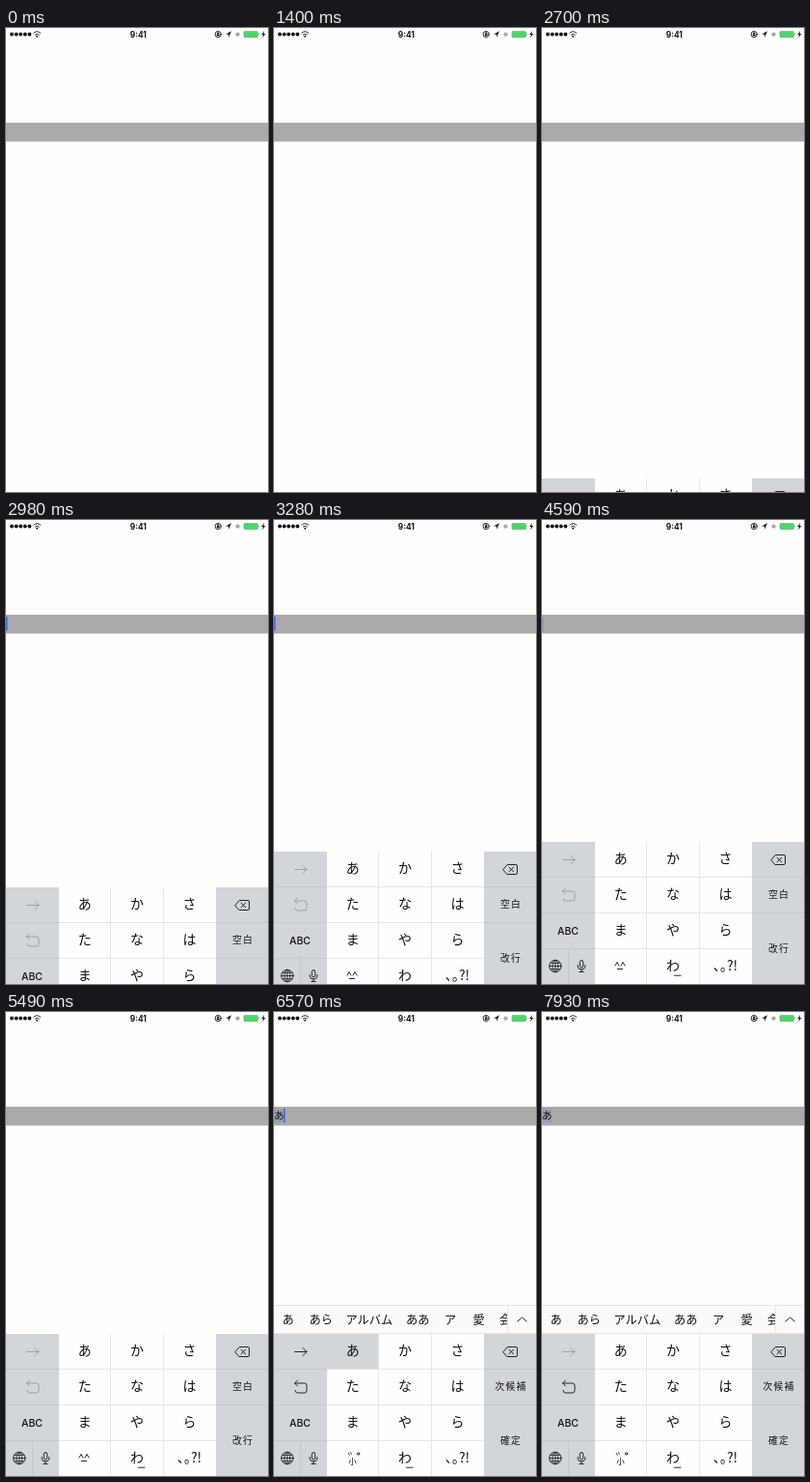
Recreate the animation shown at these times as an HTML page. Size 272 by 480 pixels, loop 8000 ms.

```html
<!DOCTYPE html>
<html lang="ja">
<head>
<meta charset="utf-8">
<style>
html, body { margin: 0; width: 100%; height: 100%; overflow: hidden; background: #fefefe; }
svg { display: block; width: 272px; height: 480px; font-family: "Noto Sans CJK JP", "Noto Sans CJK", sans-serif; fill: #111; }
.kana { font-size: 14px; text-anchor: middle; }
.label { font-size: 9.8px; text-anchor: middle; letter-spacing: 1.3px; }
.cand { font-size: 12.2px; }
.latin { font: 500 10.5px Inter, sans-serif; text-anchor: middle; }
.clock { font: 700 8.3px Inter, sans-serif; text-anchor: middle; }
.line { fill: none; stroke: #1c1c1c; stroke-width: .95; stroke-linecap: round; stroke-linejoin: round; }
.sep { fill: none; stroke: #e4e5e4; }
.edge { fill: none; stroke: #c5c8cc; }
.side { fill: #d2d5da; }
</style>
</head>
<body>
<svg viewBox="0 0 272 480">
  <g id="status">
    <g id="dots"></g>
    <path class="line" d="M28.8 5.2Q32.3 2 35.8 5.2M30.3 7Q32.3 5.2 34.3 7"/>
    <circle cx="32.3" cy="8.7" r="1"/>
    <text class="clock" x="137.3" y="9.6">9:41</text>
    <circle class="line" cx="220.2" cy="6.5" r="3.1"/>
    <path d="M218.8 6.2h2.8v2h-2.8zM219.2 6V5q1-1.4 2 0v1z"/>
    <path d="M234 3.3L227.9 6.6H231V9.8z"/>
    <circle cx="240.5" cy="6.6" r="2.2" fill="#aaa"/>
    <rect x="247" y="3.5" width="14.5" height="6.3" rx="1" fill="#4bd667" stroke="#8a9a8a" stroke-width=".6"/>
    <path d="M262.4 5.3q1.2 1.3 0 2.8z" fill="#777"/>
    <path d="M268 3L265.2 7H267L266.2 10.3L269.2 6H267.4z"/>
  </g>

  <rect y="98" width="272" height="19.5" fill="#aaa"/>
  <g id="typed">
    <rect y="100" width="10.5" height="14.5" fill="#9aa0ae"/>
    <text x="0" y="111" font-size="10.5">あ</text>
  </g>
  <rect id="caret" y="100" width="1.5" height="14.5" fill="#4065dd"/>

  <g id="bar">
    <rect y="303" width="272" height="30" fill="#fafafb"/>
    <path class="sep" d="M0 303.5H272M242.5 304V333M0 332.5H272"/>
    <clipPath id="clip"><rect y="303" width="242" height="30"/></clipPath>
    <g id="cands" class="cand" clip-path="url(#clip)"></g>
    <path class="line" d="M252.8 320L257.5 316L262.2 320"/>
  </g>

  <g id="board">
    <rect width="272" height="148" fill="#fefefe"/>
    <rect class="side" width="55" height="148"/>
    <rect class="side" x="218" width="54" height="148"/>
    <rect id="pressed" class="side" x="55" width="54" height="36.5"/>
    <path class="sep" d="M55 36.5H218M55 73.5H218M55 110.5H218M108.5 0V148M163.5 0V148"/>
    <path class="edge" d="M0 36.5H55M0 73.5H55M0 110.5H55M27.5 111V148M218 36.5H272M218 73.5H272"/>
    <g id="kana" class="kana"></g>
    <path id="next" class="line" d="M21.5 18.5H34M30 14.5L34 18.5L30 22.5"/>
    <path id="undo" class="line" d="M24.5 48L21.5 51L24.5 54M21.5 51H31.5Q34 51 34 53.5V58.5Q34 61 31.5 61H24.5Q22 61 22 58.5"/>
    <text class="latin" x="27" y="95.7">ABC</text>
    <g class="line">
      <circle cx="13.8" cy="128.5" r="6.2"/>
      <g stroke-width=".8">
        <ellipse cx="13.8" cy="128.5" rx="2.9" ry="6.2"/>
        <path d="M7.6 128.5H20M13.8 122.3V134.7M8.8 125.3H18.8M8.8 131.7H18.8"/>
      </g>
      <path d="M37.2 127.5V129Q37.5 132 41 132Q44.5 132 44.8 129V127.5M41 132V134.5M38.9 134.5H43.1"/>
      <rect x="39.3" y="122.6" width="3.4" height="7.3" rx="1.7"/>
      <path d="M238 18.5L242.3 13.5H251Q252.5 13.5 252.5 15V22Q252.5 23.5 251 23.5H242.3ZM244 16.2L248.7 20.8M248.7 16.2L244 20.8"/>
    </g>
    <path class="line" d="M137.5 138.2H144"/>
    <g id="face" class="line">
      <path d="M76 128L78 124.4L80 128M82 128L84 124.4L86 128M78.3 131.5H83.7"/>
    </g>
    <g id="marks">
      <path class="line" d="M77.3 123.5L78.2 125.2M79.5 122.7L80.3 124.2"/>
      <circle class="line" cx="87.6" cy="124" r="1.2"/>
      <text x="81.5" y="134.7" font-size="8.5" text-anchor="middle">小</text>
    </g>
    <text id="space" class="label" x="246" y="57.8"></text>
    <text id="enter" class="label" x="246" y="113.8"></text>
  </g>
</svg>
<script>
const LOOP = 8000, RISE = 2700, TYPE = 6500, RELEASE = 6680, SETTLE = 7500;
const $ = id => document.getElementById(id);
const show = (id, on) => $(id).setAttribute('visibility', on ? 'visible' : 'hidden');

function add(parent, tag, attrs, text = '') {
  const el = document.createElementNS('http://www.w3.org/2000/svg', tag);
  for (const key in attrs) el.setAttribute(key, attrs[key]);
  el.textContent = text;
  $(parent).append(el);
}

for (let i = 0; i < 5; i++) add('dots', 'circle', { cx: 6 + i * 4.6, cy: 6.5, r: 1.95 });

[['あ', 'か', 'さ'], ['た', 'な', 'は'], ['ま', 'や', 'ら'], ['', 'わ', '､｡?!']].forEach((row, r) =>
  row.forEach((key, c) => add('kana', 'text', { x: 81.7 + c * 54.4, y: 22.4 + r * 36.8 }, key)));

[['あ', 8.5], ['あら', 36.5], ['アルバム', 74.5], ['ああ', 137], ['ア', 177], ['愛', 206.5], ['会', 234]]
  .forEach(([word, x]) => add('cands', 'text', { x, y: 322.5 }, word));

const clamp = v => Math.max(0, Math.min(1, v));

// Solid, fade out, hidden, fade in; `p` counts from the start of a fade out.
function blink(p) {
  if (p < 0) return 1;
  p %= 800;
  return p < 260 ? 1 - clamp(p / 160) : clamp((p - 260) / 140);
}

function draw(t) {
  const typed = t >= TYPE;
  const left = Math.pow(1 - clamp((t - RISE) / 1100), 3.545);
  const top = t < RISE ? 480 : Math.ceil(333 + 133 * left);
  $('board').setAttribute('transform', `translate(0 ${top})`);

  show('typed', typed);
  show('bar', typed);
  show('marks', typed);
  show('face', !typed);
  show('pressed', t >= TYPE - 60 && t < RELEASE);
  $('undo').setAttribute('opacity', typed ? 1 : .3);
  $('next').setAttribute('opacity', typed && t < SETTLE ? 1 : .3);
  $('space').textContent = typed ? '次候補' : '空白';
  $('enter').textContent = typed ? '確定' : '改行';

  $('caret').setAttribute('x', typed ? 10 : 0);
  $('caret').setAttribute('opacity', t < RISE + 100 ? 0 : blink(t - (typed ? 6970 : 3680)));
}

const start = performance.now();
function tick() {
  draw((performance.now() - start) % LOOP);
  requestAnimationFrame(tick);
}
tick();
</script>
</body>
</html>
```
